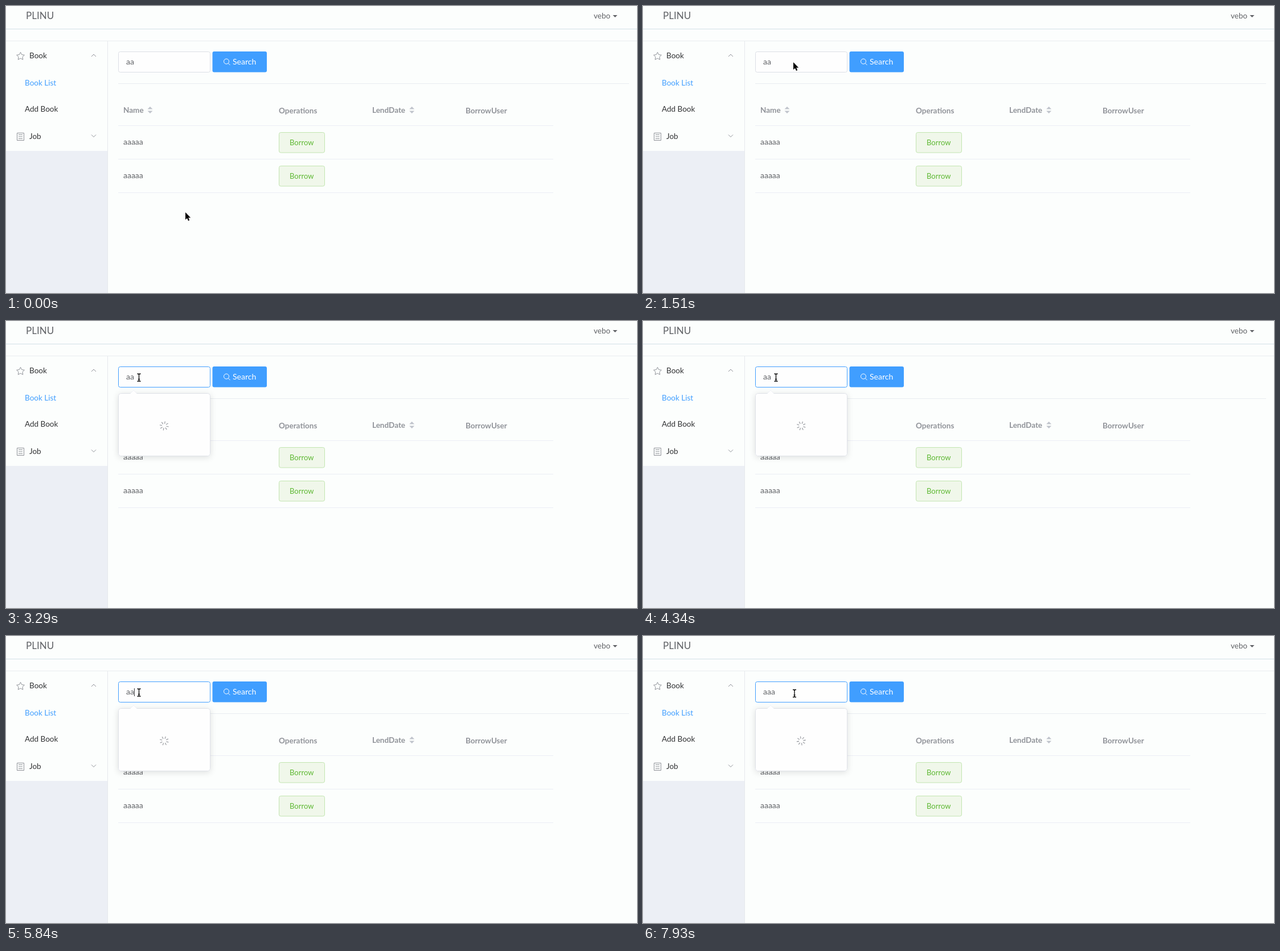
An HTML page with a canvas for the animation above (8 s loop, 1108 px wide and 505 px high).

```html
<!DOCTYPE html>
<html lang="en">
<head>
<meta charset="utf-8">
<title>Book list</title>
<style>
html, body { margin: 0; width: 100%; height: 100%; overflow: hidden; background: #fcfefd; }
canvas { display: block; }
</style>
</head>
<body>
<canvas id="stage" width="1108" height="505"></canvas>
<script>
const ctx = document.getElementById('stage').getContext('2d');
const LOOP = 8000;
const TICK = 149.5;
const PAGE = '#fcfefd';
const INK = '#303133', BODY = '#606266', MUTED = '#909399';
const BLUE = '#409eff', GREEN = '#5db832', LINE = '#ebeef5';

const mix = (a, b, p) => a + (b - a) * p;
const ease = p => p * p * (3 - 2 * p);
const clamp = p => Math.max(0, Math.min(1, p));

function text(str, x, y, color, size = 13.5, weight = 400) {
  ctx.font = `${weight} ${size}px Lato, "Open Sans", sans-serif`;
  ctx.fillStyle = color;
  ctx.fillText(str, x, y);
}

function rect(x, y, w, h, color) {
  ctx.fillStyle = color;
  ctx.fillRect(x, y, w, h);
}

function box(x, y, w, h, r, fill, stroke) {
  ctx.beginPath();
  ctx.roundRect(x, y, w, h, r);
  ctx.fillStyle = fill;
  ctx.fill();
  if (!stroke) return;
  ctx.strokeStyle = stroke;
  ctx.lineWidth = 1;
  ctx.stroke();
}

function trace(points, closed) {
  ctx.beginPath();
  points.forEach(([x, y]) => ctx.lineTo(x, y));
  if (closed) ctx.closePath();
}

function line(points, color, width = 1, closed = false) {
  trace(points, closed);
  ctx.strokeStyle = color;
  ctx.lineWidth = width;
  ctx.stroke();
}

function shape(points, color) {
  trace(points, true);
  ctx.fillStyle = color;
  ctx.fill();
}

function star(cx, cy) {
  const points = [];
  for (let i = 0; i < 10; i++) {
    const a = i * Math.PI / 5 - Math.PI / 2;
    const r = i % 2 ? 3.6 : 7.2;
    points.push([cx + r * Math.cos(a), cy + r * Math.sin(a)]);
  }
  ctx.lineJoin = 'round';
  line(points, MUTED, 1, true);
  ctx.lineJoin = 'miter';
}

function chevron(x, y, dir) {
  line([[x - 4, y - 2 * dir], [x, y + 2 * dir], [x + 4, y - 2 * dir]], MUTED);
}

function sorter(x) {
  shape([[x - 4.5, 181.5], [x, 177], [x + 4.5, 181.5]], '#c0c4cc');
  shape([[x - 4.5, 184.5], [x, 189], [x + 4.5, 184.5]], '#c0c4cc');
}

function header() {
  text('PLINU', 35, 23, BODY, 17);
  text('vebo', 1032, 22, BODY);
  shape([[1065.5, 16], [1073.5, 16], [1069.5, 20]], BODY);
  rect(0, 40, 1108, 1, '#d3dfe8');
  rect(0, 61, 1108, 1, '#e9edef');
}

function sidebar() {
  rect(0, 255, 178, 250, '#eceff5');
  rect(178, 62, 1, 443, '#e6e8ec');
  star(25.5, 88.5);
  text('Book', 41, 92, INK);
  chevron(154, 87, -1);
  text('Book List', 33, 140, BLUE);
  text('Add Book', 33, 186, INK);
  line([[19.5, 223.5], [31.5, 223.5], [31.5, 236.5], [19.5, 236.5]], MUTED, 1, true);
  for (let y = 226.5; y < 235; y += 3.5) line([[22, y], [29, y]], MUTED);
  text('Job', 41, 234, INK);
  chevron(154, 228.5, 1);
}

function table() {
  rect(197, 136, 897, 1, '#e8ecf0');
  text('Name', 206, 188, MUTED, 13.5, 700);
  sorter(253);
  text('Operations', 479, 189, MUTED, 13.5, 700);
  text('LendDate', 643, 188, MUTED, 13.5, 700);
  sorter(712.7);
  text('BorrowUser', 807, 189, MUTED, 13.5, 700);
  [210, 269, 328].forEach(y => rect(197, y, 764, 1, LINE));
  [222, 281].forEach(y => {
    text('aaaaa', 206, y + 22, BODY, 14);
    box(479.5, y + 0.5, 80, 35.5, 3, '#f0f7ea', '#c2e5b0');
    text('Borrow', 498, y + 23, GREEN, 13);
  });
}

function searchBar(value, border, caret) {
  box(197.5, 80.5, 161, 36, 3, '#fefefe', border);
  text(value, 211, 103, BODY, 14);
  if (caret) rect(211 + ctx.measureText(value).width, 92, 1, 14, INK);
  box(362.5, 80, 95.5, 36.5, 3, BLUE);
  ctx.beginPath();
  ctx.arc(387, 97.5, 4.5, 0, 7);
  ctx.strokeStyle = '#fff';
  ctx.lineWidth = 1;
  ctx.stroke();
  line([[390.2, 100.7], [393.5, 104]], '#fff');
  text('Search', 398, 103, '#fff', 14);
}

function spinner(angle) {
  ctx.save();
  ctx.translate(277.8, 184.5);
  ctx.rotate(angle);
  for (let i = 0; i < 8; i++) {
    line([[0, -3.8], [0, -8]], MUTED, 1.1);
    ctx.rotate(Math.PI / 4);
  }
  ctx.restore();
}

function popup(open, angle) {
  ctx.save();
  ctx.globalAlpha = open;
  ctx.translate(0, 122);
  ctx.scale(1, open);
  ctx.translate(0, -122);
  ctx.save();
  ctx.shadowColor = 'rgba(0,0,0,0.12)';
  ctx.shadowBlur = 12;
  ctx.shadowOffsetY = 2;
  box(197, 127, 162, 111, 4, '#fefefe');
  ctx.restore();
  box(197.5, 127.5, 161, 110, 4, '#fefefe', '#dfe2e8');
  shape([[218, 128.2], [224, 122.2], [230, 128.2]], '#fefefe');
  line([[218, 127.7], [224, 121.9], [230, 127.7]], LINE, 0.7);
  spinner(angle);
  ctx.restore();
}

function arrow(x, y) {
  const points = [[0, 0], [0, 13], [3, 10.3], [5, 15], [7.2, 14], [5.2, 9.6], [9.2, 9.4]]
    .map(([dx, dy]) => [x + dx, y + dy]);
  line(points, '#fff', 2, true);
  shape(points, '#000');
}

function beam(x, y) {
  const draw = (color, width) => {
    line([[x - 3, y - 6.5], [x - 1, y - 6.5], [x, y - 5.5], [x + 1, y - 6.5], [x + 3, y - 6.5]], color, width);
    line([[x, y - 6], [x, y + 6]], color, width);
    line([[x - 3, y + 6.5], [x - 1, y + 6.5], [x, y + 5.5], [x + 1, y + 6.5], [x + 3, y + 6.5]], color, width);
    line([[x - 1.5, y + 3], [x + 1.5, y + 3]], color, width);
  };
  draw('#fff', 2.6);
  draw('#000', 1.3);
}

function pointer(k) {
  if (k < 8) {
    const p = ease(k / 7);
    arrow(mix(315, 115.5, p), mix(363, 133.5, p));
  } else if (k < 16) {
    const p = ease(clamp((k - 7) / 3));
    arrow(mix(115.5, 264, p), mix(133.5, 99, p));
  } else if (k < 17) {
    beam(244.5, 99.5);
  } else {
    const p = ease(clamp((k - 42) / 2));
    beam(mix(233.5, 266, p), mix(99.5, 101, p));
  }
}

function render(t) {
  const k = Math.floor(t / TICK);
  const focused = k >= 19;
  const typed = k >= 42;
  const blink = (t - (typed ? 6190 : 2600)) % 1000 < 500;
  const border = focused ? BLUE : k >= 16 ? '#c0c4cc' : '#dcdfe6';
  // The spinner rests for one tick before the next letter arrives.
  const spin = k === 41 ? 40 : k;

  rect(0, 0, 1108, 505, PAGE);
  header();
  sidebar();
  table();
  searchBar(typed ? 'aaa' : 'aa', border, focused && blink);
  if (focused) popup(ease(clamp((k - 17.5) / 3)), (spin - 45) * TICK / 2000 * 2 * Math.PI);
  pointer(k);
}

function loop() {
  render(performance.now() % LOOP);
  requestAnimationFrame(loop);
}
loop();
</script>
</body>
</html>
```
